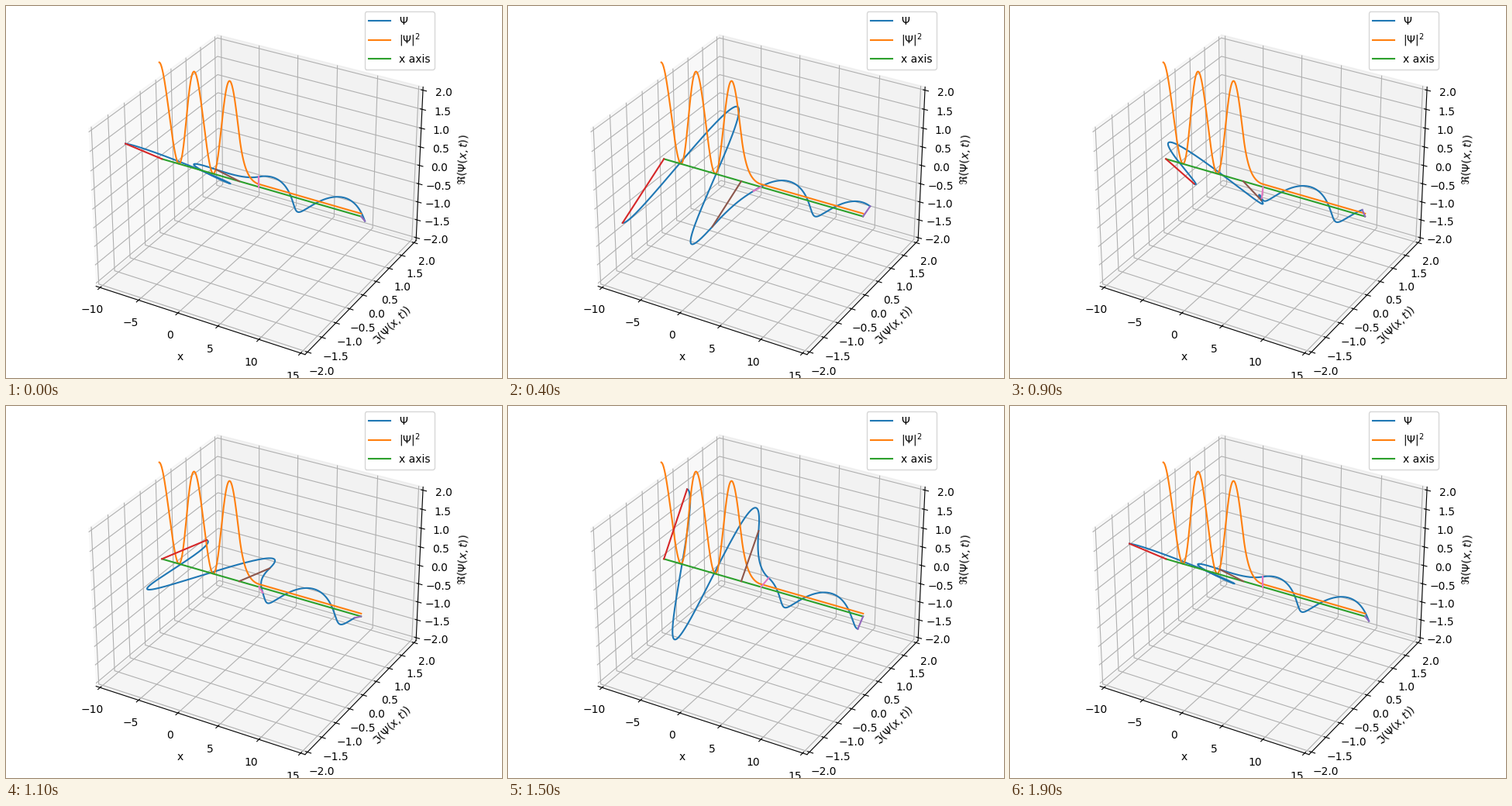
These frames come from a looping animation (640x480 px, 2000 ms). A matplotlib script:

```python
import matplotlib.pyplot as plt
import numpy as np
from matplotlib.animation import FuncAnimation

FRAMES = 20
X_MIN, X_MAX = -10, 15
WIDTH = 2.5            # barrier between 0 and WIDTH
K = np.sqrt(0.5)       # wave number, equal to the decay rate as E = V / 2
AMP = 0.8235


def stationary(x):
    """Tunnelling state of a rectangular barrier with E = V / 2."""
    t = AMP / np.cosh(K * WIDTH)
    r = -1j * AMP * np.tanh(K * WIDTH)
    s = K * (x - WIDTH)
    left = AMP * np.exp(1j * K * x) + r * np.exp(-1j * K * x)
    inside = t * (np.cosh(s) + 1j * np.sinh(s))
    right = t * np.exp(1j * s)
    return np.where(x < 0, left, np.where(x < WIDTH, inside, right))


def padded(lo, hi):
    pad = (hi - lo) / 48
    return lo - pad, hi + pad


fig = plt.figure(figsize=(6.4, 4.8), dpi=100)
ax = fig.add_axes([0, 0, 1, 1], projection="3d")

x = np.linspace(X_MIN, X_MAX, 1001)
psi = stationary(x)
zero = np.zeros_like(x)

wave, = ax.plot(x, psi.imag, psi.real, label=r"$\Psi$")
ax.plot(x, zero, np.abs(psi) ** 2, label=r"$|\Psi|^2$")
ax.plot([X_MIN, X_MAX], [0, 0], [0, 0], label="x axis")

marks = np.array([X_MIN, X_MAX, 0, WIDTH], dtype=float)
mark_psi = stationary(marks)
pointers = [ax.plot([m, m], [0, p.imag], [0, p.real])[0]
            for m, p in zip(marks, mark_psi)]

ax.set_xticks(np.arange(-10, 16, 5))
ax.set_yticks(np.arange(-2, 2.1, 0.5))
ax.set_zticks(np.arange(-2, 2.1, 0.5))
ax.set_xlim(*padded(X_MIN, X_MAX))
ax.set_ylim(*padded(-2, 2))
ax.set_zlim(*padded(-2, 2))
ax.set_xlabel("x")
ax.set_ylabel(r"$\Im(\Psi(x,t))$")
ax.set_zlabel(r"$\Re(\Psi(x,t))$")
ax.legend(loc="upper right")


def update(i):
    # the last frame completes the turn and equals the first
    turn = np.exp(-2j * np.pi * i / (FRAMES - 1))
    now = psi * turn
    wave.set_data_3d(x, now.imag, now.real)
    for line, m, p in zip(pointers, marks, mark_psi * turn):
        line.set_data_3d([m, m], [0, p.imag], [0, p.real])
    return [wave, *pointers]


anim = FuncAnimation(fig, update, frames=FRAMES, interval=100,
                     repeat=True, repeat_delay=0, blit=False)
plt.show()
```
